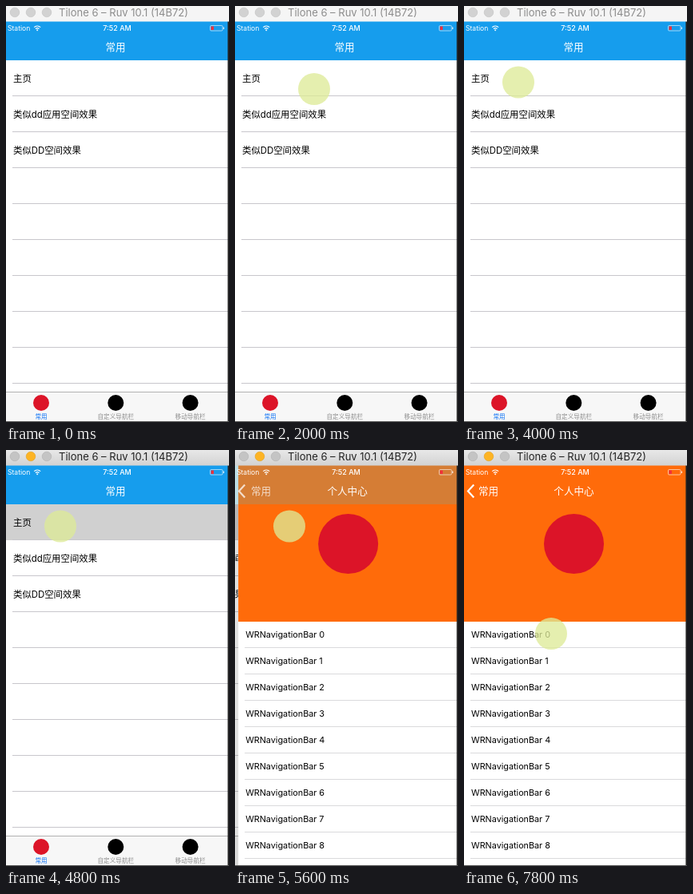
These frames come from a looping animation (279 px wide and 521 px high, 8000 ms). An HTML page:

```html
<!DOCTYPE html>
<html lang="zh">
<head>
<meta charset="utf-8">
<style>
html, body { margin: 0; width: 100%; height: 100%; overflow: hidden; background: #fff; }
svg { display: block; width: 279px; height: 521px; font-family: Inter, "Noto Sans CJK SC", "Noto Sans CJK", sans-serif; }
.mid { text-anchor: middle; }
.row { font-size: 11.4px; }
.item { font-size: 10.8px; }
.tab { font-size: 7.6px; fill: #8e8e8e; text-anchor: middle; }
.bar { font-size: 12.6px; fill: #fff; }
.status { font-size: 8.6px; fill: #fff; }
.line { stroke: #c8c7cc; stroke-width: 1; }
#items .line { stroke: #dadadc; }
</style>
</head>
<body>
<svg viewBox="0 0 279 521">
  <defs>
    <linearGradient id="chrome" x2="0" y2="1">
      <stop offset="0" stop-color="#e8e8e8"/><stop offset="1" stop-color="#d2d2d2"/>
    </linearGradient>
  </defs>
  <rect width="279" height="521" fill="#fff"/>
  <g id="home">
    <rect y="19" width="279" height="502" fill="#fff"/>
    <rect id="highlight" y="68" width="279" height="45" fill="#d0d0d0"/>
    <g id="rows"></g>
    <rect y="483" width="279" height="38" fill="#f7f7f7"/>
    <path d="M0 483.5H279" stroke="#b2b2b2"/>
    <g id="tabs"></g>
  </g>
  <rect id="dim" y="19" width="279" height="502"/>
  <g id="detail">
    <rect y="19" width="279" height="502" fill="#fff"/>
    <rect y="19" width="279" height="196" fill="#ff6b0a"/>
    <circle cx="137.5" cy="117.5" r="37.5" fill="#dc1428"/>
    <g id="items"></g>
  </g>
  <rect id="navBar" y="19" width="279" height="49"/>
  <text id="homeTitle" class="bar mid" y="56">常用</text>
  <text id="detailTitle" class="bar mid" y="56">个人中心</text>
  <g id="back">
    <path d="M12.3 43.5L5 51.5L12.3 59.5" fill="none" stroke="#fff" stroke-width="2.2"/>
    <text id="backLabel" class="bar" y="56">常用</text>
  </g>
  <text class="status" x="2" y="31">Station</text>
  <g fill="none" stroke="#fff" stroke-width="1.2">
    <path d="M35.2 26.6a6 6 0 0 1 8 0M36.9 28.6a3.6 3.6 0 0 1 4.6 0"/>
    <circle cx="39.2" cy="30.3" r=".4"/>
  </g>
  <text class="status mid" x="139" y="31" style="font-size:9px" font-weight="500">7:52 AM</text>
  <rect x="255.5" y="24.5" width="15.5" height="6.5" rx="1.3" fill="none" stroke="#fff" stroke-opacity=".75" stroke-width=".8"/>
  <rect x="256.5" y="25.5" width="3.4" height="4.5" fill="#f0303c"/>
  <rect x="271.8" y="26.5" width="1" height="2.5" fill="#fff"/>
  <path d="M278.2 19V521" stroke="#222" stroke-width="1.6"/>
  <path d="M0 520.5H279" stroke="#555"/>
  <rect id="titleBar" width="279" height="19.5"/>
  <g id="lights" stroke-width=".6"></g>
  <text id="windowTitle" x="66" y="13" font-size="13">Tilone 6 – Ruv 10.1 (14B72)</text>
  <circle id="touch" r="20" fill="#ddeb98" fill-opacity=".77"/>
</svg>
<script>
const LOOP = 8000, STEP = 200, WIDTH = 279;
const el = Object.fromEntries([...document.querySelectorAll("[id]")].map(n => [n.id, n]));
const set = (node, attrs) => Object.entries(attrs).forEach(([k, v]) => node.setAttribute(k, v));
const repeat = (n, draw) => Array.from({ length: n }, (_, i) => draw(i)).join("");
const line = y => `<path class="line" d="M8 ${y}H279"/>`;

el.rows.innerHTML = repeat(9, i => line(112.5 + 45 * i)) +
  ["主页", "类似dd应用空间效果", "类似DD空间效果"].map((s, i) =>
    `<text class="row" x="9" y="${94.5 + 45 * i}">${s}</text>`).join("");
el.tabs.innerHTML = ["常用", "自定义导航栏", "移动导航栏"].map((s, i) => {
  const x = 44 + 93.3 * i;
  return `<circle cx="${x}" cy="497" r="10" fill="${i ? "#000" : "#dc1428"}"/>
    <text class="tab" x="${x}" y="517"${i ? "" : ' style="fill:#0a70f5"'}>${s}</text>`;
}).join("");
el.items.innerHTML = repeat(9, i => line(247.5 + 33 * i) +
  `<text class="item" x="9" y="${235 + 33 * i}">WRNavigationBar ${i}</text>`);
el.lights.innerHTML = repeat(3, i => `<circle cx="${11 + 20 * i}" cy="8" r="5.8"/>`);

// Touch path: time, x, y
const path = [
  [1200, 238, 498], [1400, 195, 330], [1600, 110, 110], [1800, 56, 18],
  [2000, 99, 104], [2200, 99, 104], [3200, 79, 99], [4000, 68, 95.5],
  [6000, 68, 95.5], [6200, 65, 127.5], [6600, 187, 281], [7000, 187, 281],
  [7200, 200, 272], [7600, 125, 236], [7800, 109, 230], [8000, 109, 230]
];

function touchAt(t) {
  const i = path.findIndex(p => p[0] > t);
  const [a, b] = [path[i - 1], path[i]];
  const k = (t - a[0]) / (b[0] - a[0]);
  return { cx: a[1] + (b[1] - a[1]) * k, cy: a[2] + (b[2] - a[2]) * k };
}

function render(time) {
  const t = Math.floor((time % LOOP) / STEP) * STEP;
  const active = t >= 4600;
  const rest = t <= 4800 ? 1 : t >= 5800 ? 0 : Math.exp((4800 - t) / 190);
  const done = 1 - rest, offset = WIDTH * rest;
  const barAlpha = Math.min(1, 1.45 * Math.sqrt(rest));

  set(el.highlight, { opacity: t >= 4800 ? 1 : 0 });
  set(el.home, { transform: `translate(${-84 * done})` });
  set(el.dim, { opacity: 0.12 * done });
  set(el.detail, { transform: `translate(${offset})` });
  set(el.navBar, { opacity: barAlpha, fill: `rgb(22 ${157 + 55 * done} ${237 + 18 * done})` });
  set(el.homeTitle, { x: 137 - 107 * done, opacity: Math.max(0, 1 - 2 * done) });
  set(el.detailTitle, { x: 137.5 + 0.74 * offset, opacity: done });
  set(el.back, { opacity: Math.max(0, 1 - 1.5 * barAlpha) });
  set(el.backLabel, { x: 18 + 0.47 * offset });

  set(el.titleBar, { fill: active ? "url(#chrome)" : "#f5f5f5" });
  set(el.windowTitle, { fill: active ? "#222" : "#8c8c8c" });
  [...el.lights.children].forEach((c, i) => set(c, active && i === 1
    ? { fill: "#fdb424", stroke: "#dfa023" }
    : { fill: active ? "#c4c4c4" : "#d2d2d2", stroke: active ? "#b0b0b0" : "#c2c2c2" }));

  set(el.touch, { opacity: t < 1200 ? 0 : 1, ...(t < 1200 ? {} : touchAt(t)) });
}

const start = performance.now();
function tick() {
  render(performance.now() - start);
  requestAnimationFrame(tick);
}
tick();
</script>
</body>
</html>
```
